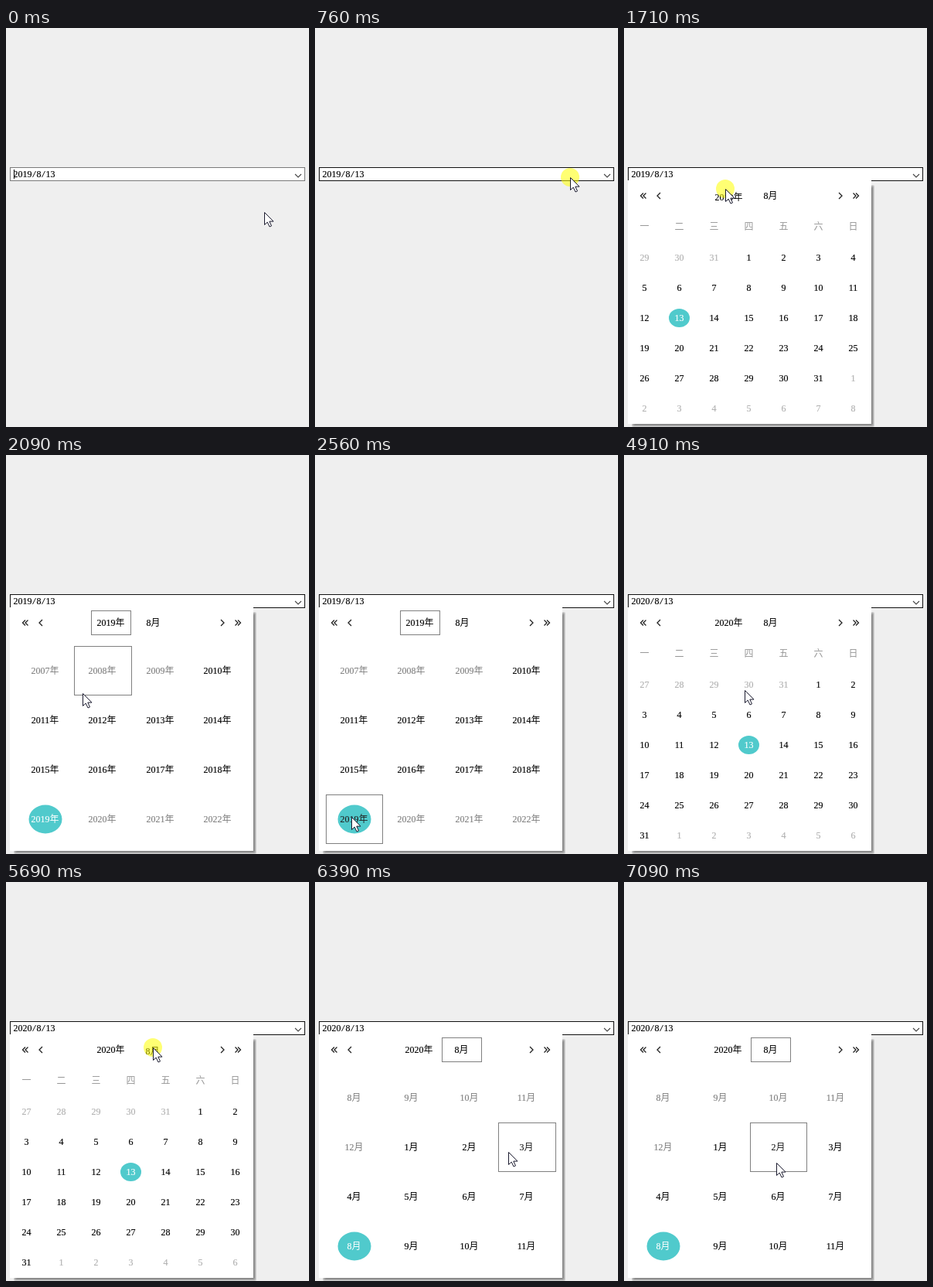
An HTML page for the animation above (8 s loop, 392 by 516 pixels).

```html
<!DOCTYPE html>
<html lang="zh">
<head>
<meta charset="utf-8">
<title>日期选择</title>
<style>
html, body { margin: 0; width: 100%; height: 100%; overflow: hidden; background: #efefef; }
svg { display: block; }
text {
  font: 300 12px "Liberation Serif", "Noto Sans CJK SC", "Noto Sans CJK JP", "Noto Sans CJK", serif;
  white-space: pre;
}
.num { stroke-width: .15px; }
.slash { font: 10px "Liberation Mono", monospace; }
</style>
</head>
<body>
<svg id="stage" width="392" height="516" viewBox="0 0 392 516"></svg>
<script>
const LOOP = 8000, TICK = 78, TICK_START = 70;
const TEAL = '#50cacc';
const GRID = { x: 14, y: 247, w: 74.4, h: 64 };
const stage = document.getElementById('stage');

// Each click shows a highlight while held and opens a view on release
const clicks = [
  { down: 760, up: 840, view: 'days' },
  { down: 1710, up: 1780, view: 'years', target: 'year' },
  { down: 4440, up: 4510, view: 'days' },
  { down: 5690, up: 5750, view: 'months', target: 'month' }
];
const yearAt = t => t < 3250 ? 2019 : t < 4510 ? 2023 : 2020;

// Pointer gestures: each glides from the last resting place, bowed sideways
const rest = { x: 334, y: 238 };
const glides = [
  { start: 0, end: 610, x: 380, y: 189 },
  { start: 700, end: 1540, x: 131, y: 208 },
  { start: 1710, end: 1940, x: 127, y: 224 },
  { start: 2012, end: 2566, x: 47, y: 468 },
  { start: 3402, end: 4040, x: 97, y: 414, bow: .17 },
  { start: 4742, end: 5245, x: 216, y: 258, bow: -.11 },
  { start: 5245, end: 5520, x: 190, y: 214 },
  { start: 6072, end: 6770, x: 204, y: 392, bow: -.4 },
  { start: 6862, end: 7090, x: 197, y: 363 }
];
const easeOut = p => 1 - (1 - p) ** 2.5;

function pointerAt(time) {
  const t = Math.max(0, TICK_START + Math.floor((time - TICK_START + 15) / TICK) * TICK);
  let { x, y } = rest;
  for (const g of glides) {
    if (t < g.start) break;
    const k = easeOut(Math.min(1, (t - g.start) / (g.end - g.start)));
    const side = 4 * k * (1 - k) * (g.bow || 0);
    const dx = g.x - x, dy = g.y - y;
    x += dx * k - dy * side;
    y += dy * k + dx * side;
  }
  return [Math.round(x), Math.round(y)];
}

// y is the vertical middle of the text
function label(str, x, y, color = '#000', anchor = 'middle') {
  const body = str.replace(/\d+/g, n => `<tspan class="num" stroke="${color}">${n}</tspan>`)
    .replace(/\/(?=<tspan)/g, '<tspan class="slash">/</tspan>');
  return `<text x="${x}" y="${y + 4}" fill="${color}" text-anchor="${anchor}">${body}</text>`;
}

const box = (x, y, w, h, stroke, fill = 'none') =>
  `<rect x="${x + .5}" y="${y + .5}" width="${w - 1}" height="${h - 1}" stroke="${stroke}" fill="${fill}"/>`;

const line = (d, color, width) =>
  `<path d="${d}" fill="none" stroke="${color}" stroke-width="${width}"/>`;

const chevron = (x, dir, r = 4) =>
  line(`M${x + r / 2 * dir} ${217 - r}l${-r * dir} ${r}l${r * dir} ${r}`, '#222', 1.3);

const doubleChevron = (x, dir) => chevron(x - 1.75, dir, 3.5) + chevron(x + 1.75, dir, 3.5);

const oval = (x, y, rx, ry) =>
  `<ellipse cx="${x}" cy="${y}" rx="${rx}" ry="${ry}" fill="${TEAL}"/>`;

function field(year, active, caret) {
  return box(5, 180, 382, 18, active ? '#111' : '#7a7a7a', '#fff') +
    label(`${year}/8/13`, 9.5, 189, '#000', 'start') +
    line('M374 189l4 4l4 -4', '#444', 1.1) +
    (caret ? line('M10.5 183v12', '#000', 1) : '');
}

function panel() {
  let out = '';
  for (let i = 1; i <= 4; i++) {
    out += `<rect x="${14 - i}" y="${207 - i}" width="${306 + 2 * i}" height="${305 + 2 * i}" rx="2" opacity=".14"/>`;
  }
  return out + '<rect x="5" y="197" width="315" height="315" fill="#fff"/>';
}

function header(view, year, pressed) {
  const frameX = { years: 110, months: 164 }[view];
  const textY = name => pressed === name ? 219 : 217;
  return doubleChevron(25, 1) + chevron(45, 1) + chevron(280, -1) + doubleChevron(300, -1) +
    (frameX ? box(frameX, 201, 52, 32, '#808080') : '') +
    label(year + '年', view === 'months' ? 134.5 : 135.5, textY('year')) +
    label('8月', view === 'years' ? 190.5 : 189.5, textY('month'));
}

function days(year) {
  const lead = (new Date(Date.UTC(year, 7, 1)).getUTCDay() + 6) % 7;
  let out = [...'一二三四五六日'].map((d, i) => label(d, 26.5 + 45 * i, 257, '#969696')).join('');
  for (let i = 0; i < 42; i++) {
    const date = new Date(Date.UTC(year, 7, 1 - lead + i));
    const n = date.getUTCDate(), current = date.getUTCMonth() === 7;
    const x = 26.5 + 45 * (i % 7), y = 297 + 39 * Math.floor(i / 7);
    const picked = current && n === 13;
    if (picked) out += oval(x, y, 13.5, 12);
    out += label(String(n), x, y, picked ? '#fff' : current ? '#000' : '#b0b0b0');
  }
  return out;
}

function cells(view, year, [px, py]) {
  const isYear = view === 'years';
  const col = Math.floor((px - GRID.x) / GRID.w);
  const row = Math.floor((py - GRID.y) / GRID.h);
  const edge = c => Math.round(GRID.x + GRID.w * c);
  let out = '';
  for (let i = 0; i < 16; i++) {
    const c = i % 4, r = Math.floor(i / 4);
    const left = edge(c), top = GRID.y + GRID.h * r;
    const x = left + 36.5, y = top + 32;
    const picked = i === 12, hover = c === col && r === row;
    const dim = isYear ? i < 3 || i > 12 : i < 5;
    if (picked) out += oval(x + .5, y, 21.5, 18.5);
    if (hover) out += box(left, top, edge(c + 1) - left, GRID.h, '#808080');
    const color = dim ? '#808080' : hover ? '#222' : picked ? '#fff' : '#000';
    out += label(isYear ? year - 12 + i + '年' : (i + 7) % 12 + 1 + '月', x, y, color);
  }
  return out;
}

const pointer = ([x, y]) =>
  `<path transform="translate(${x + .5} ${y + .5})" d="M0 0V16L3.7 12.6L6.5 18.5L9 17.4L6.3 11.6H11.5Z" fill="#fff" stroke="#1a1a2e"/>`;

function render(t) {
  const opened = clicks.filter(c => t >= c.up).pop();
  const held = clicks.find(c => t >= c.down && t < c.up);
  const year = yearAt(t), tip = pointerAt(t);
  const touched = t >= clicks[0].down;
  let out = field(year, touched || tip[1] < 198, !touched);
  if (opened) {
    const { view } = opened;
    out += panel() + header(view, year, held && held.target) +
      (view === 'days' ? days(year) : cells(view, year, tip));
  }
  if (held) out += `<circle cx="${tip[0]}" cy="${tip[1]}" r="12" fill="#ff0" opacity=".55"/>`;
  return out + pointer(tip);
}

let shown = '';
function frame(now) {
  const next = render(now % LOOP);
  if (next !== shown) stage.innerHTML = shown = next;
  requestAnimationFrame(frame);
}
frame(0);
</script>
</body>
</html>
```
